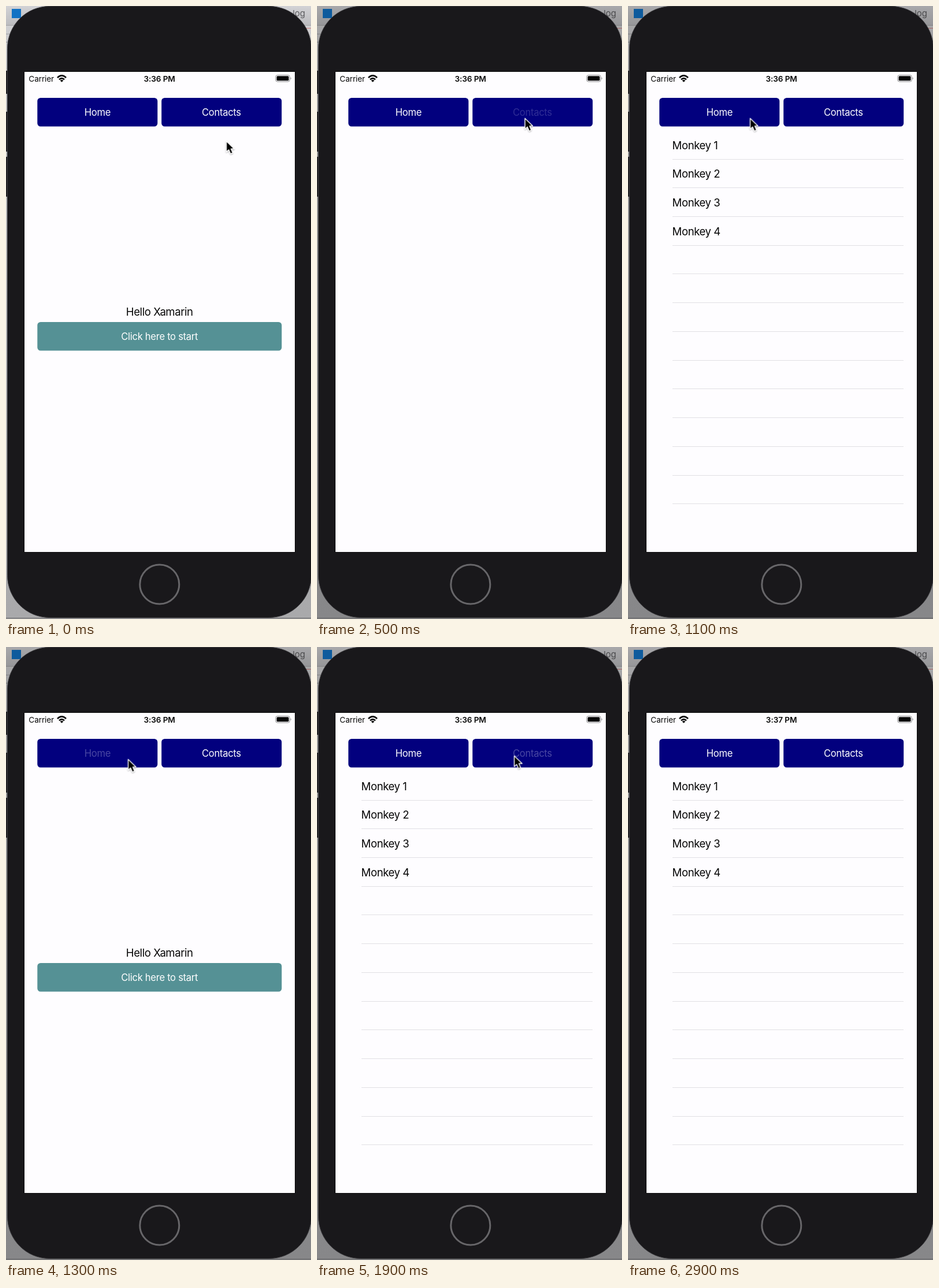
These frames come from a looping animation (528 by 1061 pixels, 3 s). An HTML page:

```html
<!DOCTYPE html>
<html lang="en">
<head>
<meta charset="utf-8">
<title>Phone simulator</title>
<style>
html, body { margin: 0; width: 100%; height: 100%; overflow: hidden; background: #19181b; }
svg { display: block; width: 528px; height: 1061px; font-family: Inter, Roboto, sans-serif; }
.mid { text-anchor: middle; }
.btn { font-size: 16.6px; letter-spacing: -.3px; fill: #fff; }
.label { font-size: 18.6px; letter-spacing: -.45px; fill: #060606; }
.status { font-size: 13.6px; letter-spacing: -.1px; fill: #060606; }
</style>
</head>
<body>
<svg viewBox="0 0 528 1061">
  <defs>
    <linearGradient id="bar" x1="0" y1="0" x2="0" y2="1">
      <stop offset="0" stop-color="#d2d2d5"/>
      <stop offset="1" stop-color="#bcbcbf"/>
    </linearGradient>
    <linearGradient id="desk" x1="0" y1="0" x2="0" y2="1">
      <stop offset="0" stop-color="#d6d6d8"/>
      <stop offset=".12" stop-color="#bdbdbf"/>
      <stop offset="1" stop-color="#a9a9ab"/>
    </linearGradient>
    <filter id="soft" x="-50%" y="-50%" width="200%" height="200%">
      <feDropShadow dx="0" dy="1.2" stdDeviation="1.1" flood-opacity=".35"/>
    </filter>
  </defs>

  <!-- desktop behind the phone -->
  <rect width="528" height="1061" fill="url(#desk)"/>
  <rect width="528" height="33" fill="url(#bar)"/>
  <rect y="33" width="528" height="1" fill="#a2a2a4"/>
  <rect x="515" y="38" width="13" height="1" fill="#d27f7f"/>
  <rect y="48" width="12" height="1" fill="#a0a0a2"/>
  <rect y="62" width="6" height="1" fill="#8d8d8f"/>
  <rect x="10" y="5" width="16" height="16" fill="#1272c4"/>
  <text x="518" y="18" font-size="15" text-anchor="end" fill="#5c5c5f">log</text>
  <rect id="shade" width="528" height="1061" opacity="0"/>
  <rect y="1059" width="528" height="1" fill="#5e5e60"/>

  <!-- phone body -->
  <g fill="#252427">
    <rect x="-3" y="112" width="8" height="40"/>
    <rect x="-3" y="183" width="8" height="69"/>
    <rect x="-3" y="261" width="8" height="69"/>
  </g>
  <rect x="2.5" y=".5" width="526" height="1058" rx="73" fill="#19181b" stroke="#39383b"/>
  <circle cx="265.8" cy="1001" r="34" fill="none" stroke="#676669" stroke-width="3"/>
  <rect x="31" y="113" width="470" height="833" fill="#0c0c0d"/>
  <rect x="32" y="114" width="468" height="831" fill="#fefdff"/>

  <!-- status bar -->
  <text class="status" x="39.3" y="130.5">Carrier</text>
  <g fill="none" stroke="#060606" stroke-width="2.6">
    <path d="M89 124.2Q96.5 116.6 104 124.2"/>
    <path d="M92 127.3Q96.5 123 101 127.3"/>
  </g>
  <path d="M93.7 129Q96.5 126.6 99.3 129L96.5 131.8Z" fill="#060606"/>
  <g class="status mid" font-weight="600">
    <text id="early" x="265.6" y="130.5">3:36 PM</text>
    <text id="late" x="265.6" y="130.5" opacity="0">3:37 PM</text>
  </g>
  <rect x="466.8" y="119.6" width="24.4" height="11.4" rx="3" fill="none" stroke="#8b8b8d" stroke-width="1"/>
  <rect x="468.5" y="121.3" width="21" height="8" rx="1.6" fill="#060606"/>
  <path d="M492.6 123.3Q495 125.3 492.6 127.3Z" fill="#8b8b8d"/>

  <!-- tabs -->
  <rect x="54.3" y="159" width="208" height="49.6" rx="5.5" fill="#02007e"/>
  <rect x="269.2" y="159" width="208" height="49.6" rx="5.5" fill="#02007e"/>
  <text id="homeTab" class="btn mid" x="158.4" y="190">Home</text>
  <text id="listTab" class="btn mid" x="372.9" y="190">Contacts</text>

  <g id="home">
    <text class="label mid" x="265.7" y="535.6">Hello Xamarin</text>
    <rect x="54.3" y="547" width="423" height="49.6" rx="5.5" fill="#559195"/>
    <text class="btn mid" x="265.7" y="578">Click here to start</text>
  </g>
  <g id="list" opacity="0"></g>

  <g id="cursor" filter="url(#soft)">
    <path d="M0 0V18.6L4.2 14.7L7.2 21.8L11 20.2L8 13.3H13.6Z"
      fill="#050505" stroke="#fff" stroke-width="1.4" stroke-linejoin="round"/>
  </g>
</svg>
<script>
const LOOP = 3000;
const $ = id => document.getElementById(id);

function add(parent, tag, attrs, text = '') {
  const el = document.createElementNS('http://www.w3.org/2000/svg', tag);
  for (const [key, val] of Object.entries(attrs)) el.setAttribute(key, val);
  el.textContent = text;
  parent.append(el);
}

const ROW = 49.72;
for (let i = 0; i < 13; i++) {
  add($('list'), 'rect', { x: 77, y: Math.round(264.6 + i * ROW), width: 400, height: 1, fill: '#e1e0e4' });
  if (i < 4) add($('list'), 'text', { class: 'label', x: 76.6, y: 247.6 + i * ROW }, `Monkey ${i + 1}`);
}

// Each step is [time in ms, value]; a value holds until the next step.
function play(id, prop, steps) {
  const frames = steps.map(([t, val]) => ({ offset: t / LOOP, [prop]: val, easing: 'step-end' }));
  frames.push({ offset: 1, [prop]: steps[steps.length - 1][1] });
  return $(id).animate(frames, { duration: LOOP, iterations: Infinity });
}

// A pressed tab title comes back over the following steps.
const fade = (start, levels) => levels.map((v, i) => [start + i * 100, v]);
const at = (t, x, y) => [t, `translate(${x}px, ${y}px)`];

const runs = [
  play('shade', 'opacity', [[0, 0], [300, .1], [400, .2]]),
  play('home', 'opacity', [[0, 1], [500, 0], [1300, 1], [1900, 0]]),
  play('list', 'opacity', [[0, 0], [600, 1], [1300, 0], [1900, 1]]),
  play('homeTab', 'opacity', [[0, 1], ...fade(1300, [.28, .5, .72, .9, 1])]),
  play('listTab', 'opacity', [[0, 1], ...fade(500, [.18, .42, .68, .88, 1]), ...fade(1900, [.28, .5, .72, .9, 1])]),
  play('early', 'opacity', [[0, 1], [2900, 0]]),
  play('late', 'opacity', [[0, 0], [2900, 1]]),
  play('cursor', 'transform', [
    at(0, 381.5, 234), at(200, 376, 222), at(300, 365, 203), at(400, 360, 194.5),
    at(800, 338, 194.5), at(900, 281, 194.5), at(1000, 228, 194.5), at(1100, 211.5, 194.5),
    at(1500, 228, 193.5), at(1600, 279, 191), at(1700, 326, 189), at(1800, 341.5, 188.5),
    at(2200, 346, 160), at(2300, 358, 70), at(2400, 370, -60)
  ])
];
for (const run of runs) run.startTime = document.timeline.currentTime;
</script>
</body>
</html>
```
